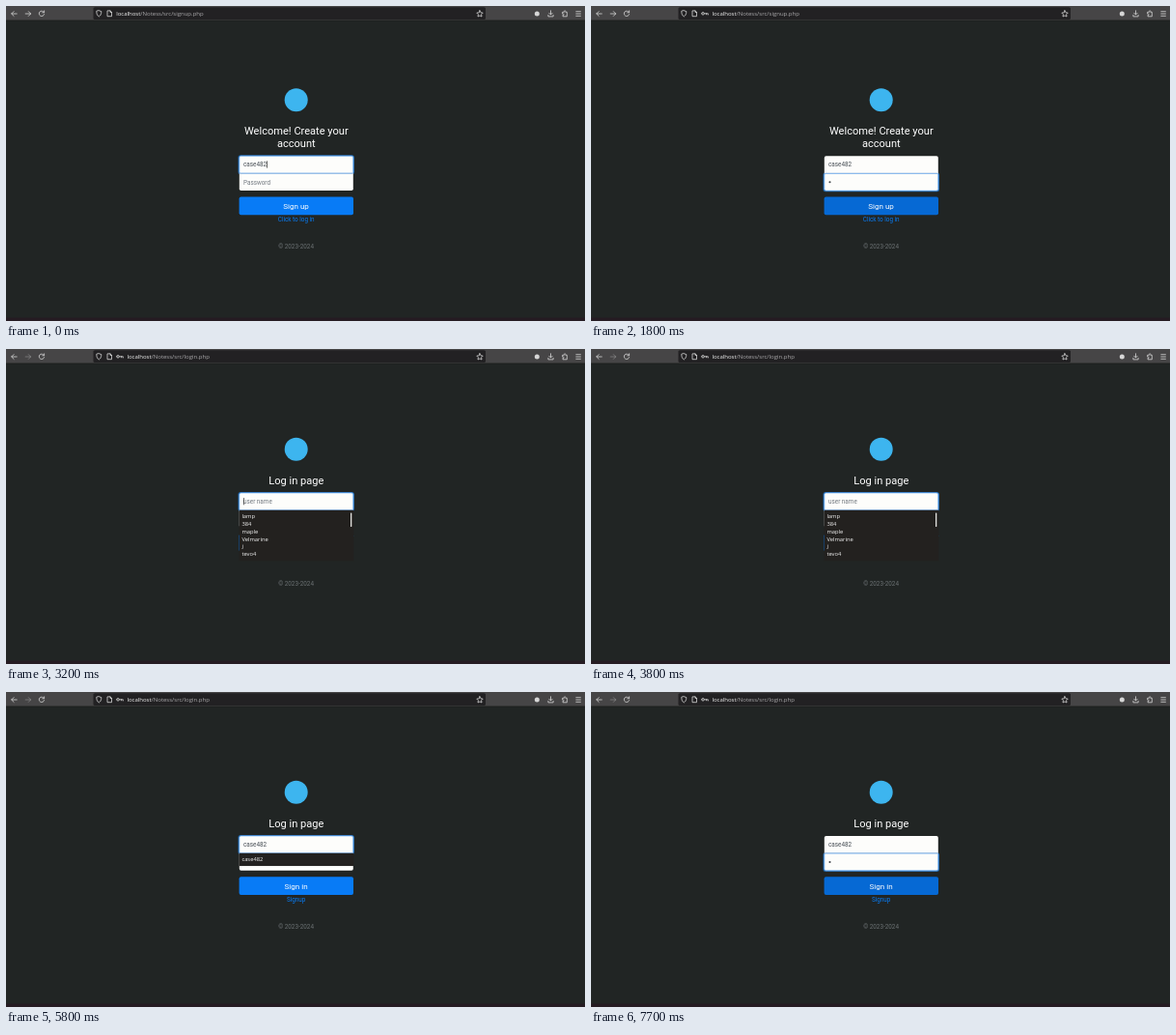
Animation, 600 px wide and 326 px high, one loop 8000 ms. Source, as an HTML page:

```html
<!DOCTYPE html>
<html lang="en">
<head>
<meta charset="utf-8">
<title>Sign up and log in</title>
<style>
  html, body { margin: 0; width: 100%; height: 100%; overflow: hidden; background: #212524; }
  svg { display: block; width: 600px; height: 326px; }
  text { white-space: pre; }
  .page { font-family: Roboto, sans-serif; font-size: 6.35px; }
  .ui { font-family: "Open Sans", sans-serif; font-size: 5.8px; fill: #f4f4f4; }
  .mid { text-anchor: middle; }
  .title { font-size: 11.07px; fill: #fff; }
  .btn { font-size: 8px; fill: #fff; }
  .link { fill: #087bf3; }
  .foot { fill: #6a7072; }
  .icon { fill: none; stroke: #d6d6d6; stroke-width: .8; stroke-linecap: round; stroke-linejoin: round; }
</style>
</head>
<body>
<svg viewBox="0 0 600 326">
  <rect width="600" height="326" fill="#212524"/>
  <rect width="600" height="15" fill="#464546"/>
  <rect y="14.6" width="600" height=".7" fill="#171918"/>
  <rect x="90.5" y="1.2" width="406.5" height="12.8" rx="1.6" fill="#222123"/>
  <rect y="322.6" width="600" height="3.4" fill="#251b22"/>

  <g class="icon">
    <path d="M11.2 8H5.8M8.1 5.6L5.7 8l2.4 2.4"/>
    <path id="forward" d="M20.2 8h5.4M23.3 5.6L25.7 8l-2.4 2.4"/>
    <path id="reload" d="M39.3 6.4A2.7 2.7 0 1 0 39.6 8.6M39.6 4.9v1.9h-1.9"/>
    <path id="stop" d="M34.8 5.7l4.4 4.4M39.2 5.7l-4.4 4.4"/>
    <path d="M96.3 4.7l2.5.9c0 2.6-.7 4.2-2.5 5.3-1.8-1.1-2.5-2.7-2.5-5.3z"/>
    <path d="M105.4 4.9h2.6l1.5 1.5v4.3h-4.1zM108 4.9v1.6h1.5"/>
    <path id="key" d="M114.7 7.8a1.3 1.3 0 1 0 2.6 0a1.3 1.3 0 1 0-2.6 0M117.3 7.8h4v1.2M119.6 7.8v1"/>
    <path d="M491 4.7l1 2.1 2.2.3-1.6 1.6.4 2.3-2-1.1-2 1.1.4-2.3-1.6-1.6 2.2-.3z"/>
    <path d="M564.5 4.8v4M562.8 7.3l1.7 1.7 1.7-1.7M561.9 9.3v1.6h5.2V9.3"/>
    <path d="M577 6.3h1.4c-.6-2 2-2 1.4 0h1.5v4.5H577V9.4c1.6.4 1.6-1.8 0-1.4z"/>
    <path d="M590.8 5.7h4.6M590.8 8h4.6M590.8 10.3h4.6"/>
  </g>
  <circle cx="550.3" cy="7.9" r="2.5" fill="#d6d6d6"/>
  <text id="url" class="ui" y="9.9" style="font-size:6px"><tspan>localhost</tspan><tspan id="path" fill="#aaa9ab"></tspan></text>

  <g class="page">
    <circle id="logo" r="12"/>
    <text id="title1" class="mid title" x="300.8"></text>
    <text id="title2" class="mid title" x="300.8" y="146">account</text>
    <g id="form">
      <rect id="ring" x="240.5" width="120.5" height="20" rx="2.5" fill="#1c5f9f"/>
      <path d="M241.8 18V2q0-1.8 1.8-1.8h114.4q1.8 0 1.8 1.8v16z" fill="#fdfdfb"/>
      <path d="M241.8 18.3v16q0 1.8 1.8 1.8h114.4q1.8 0 1.8-1.8v-16z" fill="#fdfdfb"/>
      <path d="M241.8 18.2h118" stroke="#bcc1c5" stroke-width=".6"/>
      <rect id="edge" x="241.8" width="118" height="17.9" rx="1.6" fill="none" stroke="#6fb2fa" stroke-width=".8"/>
      <text id="name" x="246" y="11.3"></text>
      <text id="pass" x="246" y="29.5"></text>
      <circle id="dot" cx="247.5" cy="27.3" r="1.05" fill="#3d4248"/>
      <rect id="caret" width=".7" height="7.2" fill="#222"/>
      <rect id="button" x="241.6" y="42.5" width="118.4" height="18.8" rx="2"/>
      <text id="action" class="mid btn" x="300.6" y="55"></text>
      <text id="link" class="mid link" x="300.7" y="68.4"></text>
      <text class="mid foot" x="300.6" y="96.4">© 2023-2024</text>
    </g>
  </g>

  <g id="suggest" class="ui">
    <rect x="242" y="192.4" width="123" height="42" fill="#23221f"/>
    <g class="icon" style="stroke-width:.5">
      <circle cx="248" cy="198.4" r="2.7"/>
      <ellipse cx="248" cy="198.4" rx="1.2" ry="2.7"/>
      <path d="M245.3 198.4h5.4"/>
    </g>
    <text x="252.3" y="200.8" style="font-size:5.7px">Use a Securely Generated Password</text>
    <text x="252.5" y="208.3" fill="#c9c9c7" style="font:5.7px 'DejaVu Sans Mono', monospace">kh5rHMWQx2gA5Hj</text>
    <text x="252.5" y="216" fill="#9b9b98" style="font-size:4.4px;font-style:italic;fill:#a3a3a0">Tarnbel will save this password for this website.</text>
    <rect x="242" y="219" width="123" height="15.4" fill="#5b5b59"/>
    <text class="mid" x="303.3" y="228.8">View Saved Logins</text>
  </g>

  <g id="list" class="ui">
    <rect id="listBox" x="241.8" y="166.8" width="118.4" fill="#23211f"/>
    <g id="items"></g>
    <rect id="thumb" x="357" y="169.5" width="1.3" height="14.5" rx=".6" fill="#e4e4e2"/>
  </g>

  <g id="status" class="ui">
    <rect y="317.5" width="63" height="8.5" fill="#1d1c1f"/>
    <text x=".6" y="324" style="font-size:5.65px">Waiting for localhost…</text>
  </g>
</svg>

<script>
const LOOP = 8000;
const USER = "case482";
const SAVED = ["lamp", "384", "maple", "Velmarine", "j", "tevo4"];
const BLUE = "#3db5ef", GOLD = "#b3921f";

const PAGES = {
  signup: { path: "signup.php", title: "Welcome! Create your", titleY: 133, logoY: 97.3, formY: 155,
            hint: "", action: "Sign up", link: "Click to log in" },
  login:  { path: "login.php", title: "Log in page", titleY: 139.5, logoY: 103.8, formY: 148.7,
            hint: "user name", action: "Sign in", link: "Signup" }
};

// Each step overrides part of the state; "caret" is the row it blinks in.
const STEPS = [
  [0,    { page: "signup", typed: 7, dot: false, ring: 0, caret: 0, key: false, busy: false, waiting: false,
           hover: false, suggest: false, list: [], logo: BLUE }],
  [800,  { ring: 1, caret: 1, suggest: true }],
  [1200, { dot: true, suggest: false, key: true }],
  [1800, { hover: true }],
  [2100, { busy: true, waiting: true, ring: -1, caret: -1 }],
  [2400, { page: "login", typed: 0, dot: false, hover: false, caret: 0 }],
  [2700, { ring: 0 }],
  [2800, { busy: false, waiting: false }],
  [3200, { list: SAVED, caret: 0 }],
  [4200, { typed: 1, list: [USER], logo: GOLD }],
  [4500, { typed: 2 }],
  [4700, { typed: 3 }],
  [4800, { typed: 4 }],
  [5000, { typed: 5 }],
  [5100, { typed: 6 }],
  [5300, { typed: 7 }],
  [5800, { logo: BLUE }],
  [6100, { list: [], ring: 1, caret: 1 }],
  [6700, { dot: true }],
  [6900, { hover: true, caret: -1 }]
];

const el = {};
document.querySelectorAll("[id]").forEach(node => el[node.id] = node);
const set = (node, attrs) => Object.entries(attrs).forEach(([k, v]) => node.setAttribute(k, v));
const show = (node, on) => node.style.display = on ? "" : "none";

function stateAt(time) {
  const state = { lastEdit: 0 };
  for (const [start, patch] of STEPS) {
    if (start > time) break;
    Object.assign(state, patch);
    if ("typed" in patch || "caret" in patch || "dot" in patch) state.lastEdit = start;
  }
  return state;
}

function drawPage(s) {
  const page = PAGES[s.page], login = s.page === "login";
  el.path.textContent = "/Notess/src/" + page.path;
  el.url.setAttribute("x", s.key ? 125.4 : 114.2);
  show(el.key, s.key);
  show(el.reload, !s.busy);
  show(el.stop, s.busy);
  el.forward.style.opacity = login ? .4 : 1;
  set(el.logo, { cx: s.logo === GOLD ? 302.3 : 300.7, cy: page.logoY, fill: s.logo });
  el.title1.textContent = page.title;
  el.title1.setAttribute("y", page.titleY);
  show(el.title2, !login);
  el.form.setAttribute("transform", `translate(0 ${page.formY})`);
  el.action.textContent = page.action;
  el.link.textContent = page.link;
  el.button.setAttribute("fill", s.hover ? "#0669d4" : "#087bf6");
  return page;
}

function drawFields(s, page, time) {
  const text = USER.slice(0, s.typed);
  el.name.textContent = text || page.hint;
  el.name.setAttribute("fill", text ? "#495057" : "#737980");
  el.pass.textContent = s.dot ? "" : "Password";
  el.pass.setAttribute("fill", "#737980");
  show(el.dot, s.dot);
  for (const node of [el.ring, el.edge]) show(node, s.ring >= 0);
  el.ring.setAttribute("y", s.ring * 18.1 - .8);
  el.edge.setAttribute("y", s.ring * 18.1 + .2);
  const width = s.caret ? (s.dot ? 3.2 : 0) : text ? el.name.getComputedTextLength() : 0;
  set(el.caret, { x: 246 + width, y: s.caret * 18.1 + 5.4 });
  show(el.caret, s.caret >= 0 && (time - s.lastEdit) % 1000 < 500);
}

function drawPopups(s) {
  show(el.suggest, s.suggest);
  show(el.status, s.waiting);
  show(el.list, s.list.length);
  show(el.thumb, s.list.length > 1);
  el.listBox.setAttribute("height", s.list.length * 7.85 + 5.4);
  el.items.innerHTML = s.list.map((item, i) =>
    `<text x="244.4" y="${175.2 + i * 7.8}">${item}</text>`).join("");
}

let drawn = "";
function frame() {
  const time = performance.now() % LOOP;
  const state = stateAt(time);
  const look = JSON.stringify(state) + Math.floor((time - state.lastEdit) / 500);
  if (look !== drawn) {
    drawn = look;
    drawFields(state, drawPage(state), time);
    drawPopups(state);
  }
  requestAnimationFrame(frame);
}
frame();
</script>
</body>
</html>
```
